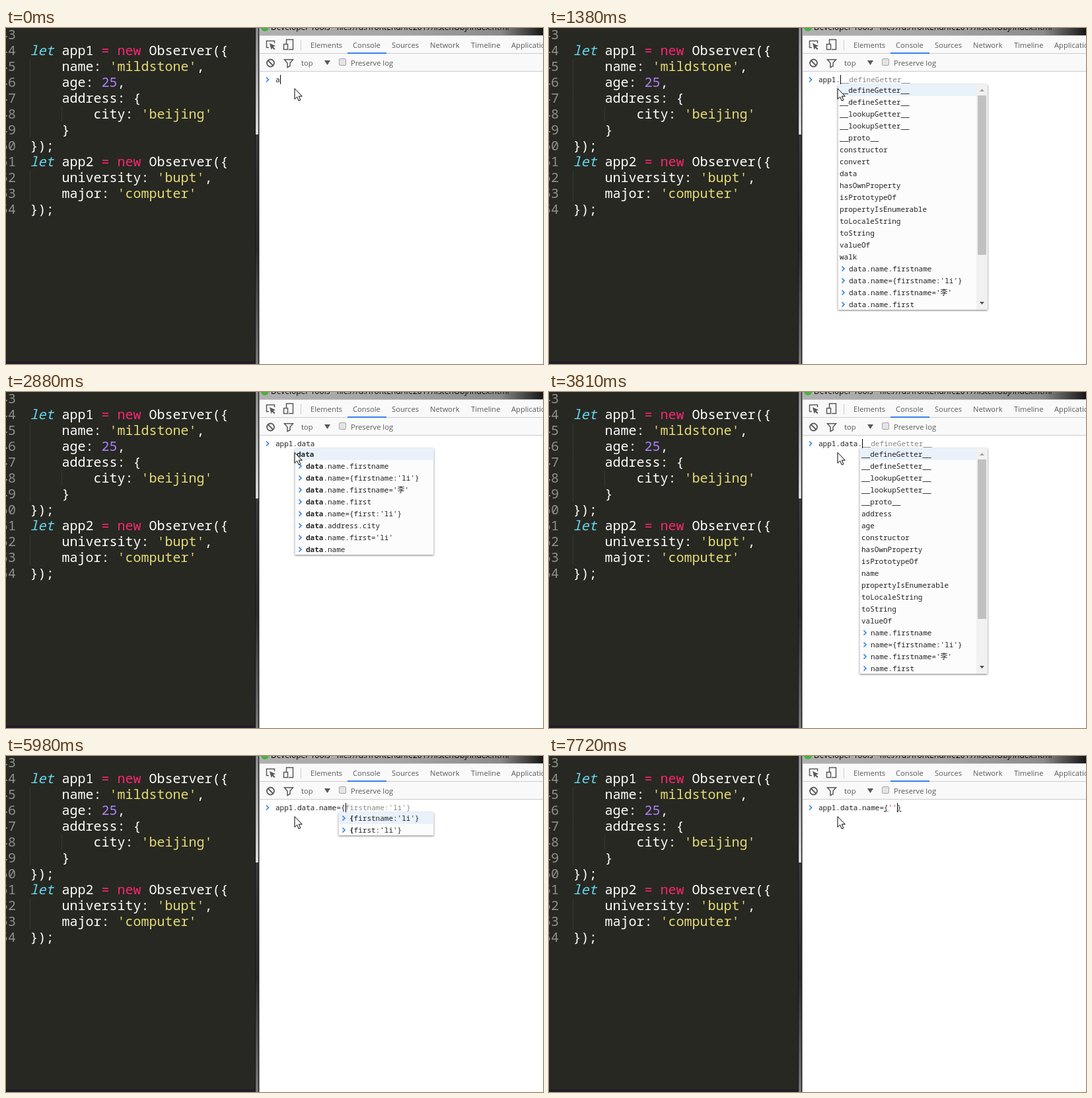
Recreate the animation shown at these times as an HTML page. Size 813x508 px, loop 8 s.

```html
<!DOCTYPE html>
<html lang="en">
<head>
<meta charset="utf-8">
<title>Observer console</title>
<style>
html, body { margin: 0; width: 100%; height: 100%; overflow: hidden; background: #fff; }
svg { display: block; width: 813px; height: 508px; }
text { white-space: pre; }
.code { font: 500 20px "Noto Sans Mono", "DejaVu Sans Mono", monospace; fill: #fff; }
.num { fill: #8f908a; text-anchor: end; }
.let { fill: #66d9ef; font-style: italic; }
.op { fill: #f92672; }
.str { fill: #e6db74; }
.val { fill: #ae81ff; }
.ui { font: 11.2px "Open Sans", "Noto Sans", sans-serif; fill: #5a5a5a; }
.mono { font: 11px "Noto Sans Mono", "Noto Sans CJK SC", "DejaVu Sans Mono", monospace; fill: #222; }
.hint { fill: #888; }
.quote { fill: #c41a16; }
.pair { text-decoration: underline; text-decoration-skip-ink: none; }
.b { font-weight: 700; }
.chevron { fill: none; stroke: #2f7de9; stroke-width: 1.6; }
.icon { fill: none; stroke: #5a5a5a; stroke-width: 1.5; }
.popup { filter: drop-shadow(0 1px 1.5px #0008); }
</style>
</head>
<body>
<svg viewBox="0 0 813 508">
  <defs>
    <linearGradient id="thumb" x2="0" y2="1">
      <stop stop-color="#8a8a8a"/><stop offset="1" stop-color="#dcdcdc"/>
    </linearGradient>
    <linearGradient id="track" x2="0" y2="1">
      <stop stop-color="#3a3a3a"/><stop offset=".5" stop-color="#2c2c2c"/><stop offset="1" stop-color="#777"/>
    </linearGradient>
    <linearGradient id="title">
      <stop stop-color="#b0b0b0"/><stop offset=".5" stop-color="#a4a4a4"/>
      <stop offset=".85" stop-color="#8a8a8a"/><stop offset="1" stop-color="#161616"/>
    </linearGradient>
  </defs>

  <rect width="377" height="508" fill="#272822"/>
  <rect y="504" width="377" height="4" fill="#221d28"/>
  <path d="M36.500 48V166M36.500 216V262M84.500 119V142" stroke="#4a4b44" stroke-dasharray="1 1"/>
  <g id="editor"></g>
  <rect x="377" width="6" height="508" fill="#17161a"/>
  <rect x="378" width="4" height="161" fill="url(#thumb)"/>
  <rect x="378" y="161" width="4" height="347" fill="url(#track)"/>

  <rect x="383" width="430" height="508" fill="#fff"/>
  <path d="M383.500 0V508" stroke="#999"/>
  <rect x="384" width="429" height="11" fill="url(#title)"/>
  <circle cx="392" cy="-1" r="6" fill="#4caf3f"/>
  <text class="ui" x="401" y="2.500" style="font-size:12px;fill:#000">Developer Tools - file:///d:/frontEnd/ife2017/listenObj/index.html</text>
  <rect x="384" y="11" width="429" height="55" fill="#f9f9f9"/>
  <path d="M384 11.500H813M384 38.500H813M384 65.500H813M446.500 18V34" stroke="#ccc"/>
  <rect x="517" y="37" width="59" height="2" fill="#3b82f0"/>
  <g id="tabs"></g>

  <g class="icon">
    <path d="M398 29.500H394.500V19.500H406.500V23"/>
    <path d="M399 23l9 4-3.500 1.500 3 3-1.500 1.500-3-3-1.500 3z" fill="#5a5a5a" stroke="none"/>
    <path d="M424.500 24V17.500H434.500V32.500H428"/>
    <rect x="420.500" y="24.500" width="6" height="8"/>
    <circle cx="400.500" cy="53" r="5.500" stroke-width="1.800"/>
    <path d="M396.500 49l8 8" stroke-width="1.800"/>
    <path d="M421.500 47.700H434.500L430 53V57.500L426 59.500V53Z"/>
  </g>
  <path d="M482 49h9l-4.500 7z" fill="#5a5a5a"/>
  <rect x="504.500" y="46.500" width="10" height="10" rx="1.500" fill="#e4e4e4" stroke="#a5a5a5"/>
  <path class="chevron" d="M394 74.500l3.500 3.500-3.500 3.500"/>

  <g id="live"></g>
  <path d="M437 91.500v16l3.700-3.400 2.600 6 2.600-1.200-2.600-5.700h5z" fill="#fff" stroke="#000"/>
</svg>

<script>
const CHAR = 6.6, INPUT_X = 408, TOP = 85, ROW = 18, MAX_ROWS = 19, LOOP = 8000;
const el = id => document.getElementById(id);
const span = (cls, s) => `<tspan class="${cls}">${s}</tspan>`;
const text = (cls, x, y, s) => `<text class="${cls}" x="${x}" y="${y}">${s}</text>`;

const source = [
  "",
  "let app1 = new Observer({",
  "    name: 'mildstone',",
  "    age: 25,",
  "    address: {",
  "        city: 'beijing'",
  "    }",
  "});",
  "let app2 = new Observer({",
  "    university: 'bupt',",
  "    major: 'computer'",
  "});"
];
const paint = line => line.replace(/('.*?')|\b(let)\b|(=|\bnew\b)|\b(\d+)\b/g,
  (s, str, word, op) => span(str ? "str" : word ? "let" : op ? "op" : "val", s));
el("editor").innerHTML = source.map((line, i) => {
  const y = 17 + 24 * i;
  return text("code num", 15, y, 43 + i) + text("code", 36.5, y, paint(line));
}).join("");

const labels = [[461, "Elements"], [525, "Console"], [584, "Sources"], [642, "Network"],
  [704, "Timeline"], [765, "Application"], [447, "top", 57], [522, "Preserve log", 57]];
el("tabs").innerHTML = labels.map(([x, s, y = 30]) => text("ui", x, y, s)).join("");

// Completions by the expression before the word being typed
const dunder = ["__defineGetter__", "__defineSetter__", "__lookupGetter__", "__lookupSetter__", "__proto__"];
const tail = ["propertyIsEnumerable", "toLocaleString", "toString", "valueOf"];
const members = {
  "": ["addEventListener", "alert", "applicationCache", "atob"],
  "app1.": [...dunder, "constructor", "convert", "data", "hasOwnProperty", "isPrototypeOf", ...tail, "walk"],
  "app1.data.": [...dunder, "address", "age", "constructor", "hasOwnProperty", "isPrototypeOf", "name", ...tail]
};
const history = [
  "app1.data.name.firstname", "app1.data.name={firstname:'li'}", "app1.data.name.firstname='李'",
  "app1", "app1.data.name.first", "app1.data.name={first:'li'}", "app1.data.address.city",
  "app.data.name={first:'li'}", "app1.data.name.first='li'", "app1.data.name",
  "app.user.name", "app1.name", "app.user"
];

// [time, input with "|" as a visible caret, popup query if it differs from the input]
const steps = [
  [0, "a|", ""], [270, "a|"], [550, "ap|"], [700, "app|"], [950, "app1|"], [1380, "app1.|"],
  [1940, "app1.d|", "app1."], [2090, "app1.d|"], [2210, "app1.da|"], [2330, "app1.dat|"],
  [2480, "app1.data|"], [2880, "app1.data"], [3410, "app1.data|"],
  [3690, "app1.data.|", ""], [3810, "app1.data.|"], [4080, "app1.data.n|"],
  [4200, "app1.data.na|"], [4350, "app1.data.nam|"], [4500, "app1.data.name|"],
  [4970, "app1.data.name"], [5550, "app1.data.name=|"], [5980, "app1.data.name={|"],
  [6410, "app1.data.name={"], [6560, "app1.data.name={}|", ""], [6860, "app1.data.name={|}", ""],
  [7450, "app1.data.name={}", ""], [7600, "app1.data.name={'|}", ""], [7720, "app1.data.name={''|}", ""]
];

function suggest(query) {
  const start = query.search(/[^.=]*$/), word = query.slice(start);
  const found = (members[query.slice(0, start)] || []).filter(s => s.startsWith(word));
  const past = history.filter(s => s.startsWith(query)).map(s => s.slice(start));
  return { start, word, fresh: found.length, rows: [...found, ...past] };
}

function drawPopup({ start, word, fresh, rows }) {
  const left = INPUT_X + start * CHAR - 3.5, scrolls = rows.length > MAX_ROWS;
  const shown = rows.slice(0, MAX_ROWS), height = shown.length * ROW;
  const width = (scrolls ? 664 : 647.5) - left;
  let out = `<rect class="popup" x="${left}" y="${TOP}" width="${width}" height="${height - 1}" fill="#fcfcfc"/>
    <rect x="${left}" y="${TOP}" width="${647.5 - left}" height="${ROW}" fill="#e9f1fb"/>`;
  shown.forEach((s, i) => {
    const y = TOP + ROW * i + 9, past = i >= fresh;
    if (past) out += `<path class="chevron" d="M${left + 6} ${y - 3.5}l3.500 3.500-3.500 3.500"/>`;
    out += text("mono", left + (past ? 16.5 : 2.5), y + 4, span("b", word) + s.slice(word.length));
  });
  if (scrolls) out += `<rect x="647" y="${TOP}" width="17" height="${height - 1}" fill="#f1f1f1"/>
    <rect x="649" y="102" width="13" height="241" fill="#c1c1c1"/>
    <path d="M652 96h7l-3.500-4z" fill="#a3a3a3"/><path d="M652 414h7l-3.500 4z" fill="#505050"/>`;
  return out;
}

function draw([, input, query]) {
  const typed = input.replace("|", ""), caret = input.indexOf("|");
  const key = query ?? typed;
  const list = key && suggest(key);
  let line = typed.replace(/'/g, s => span("quote", s));
  if (typed.endsWith("}")) line = line.replace(/[{}]/g, s => span("pair", s));
  if (list) line += span("hint", list.rows[0].slice(typed.length - list.start));
  let out = text("mono", INPUT_X, 82, line);
  if (list) out += drawPopup(list);
  if (caret >= 0) out += `<rect x="${Math.round(INPUT_X + caret * CHAR)}" y="71" width="1" height="14"/>`;
  el("live").innerHTML = out;
}

let current;
function frame() {
  const t = performance.now() % LOOP;
  const step = steps.findLast(s => s[0] <= t);
  if (step !== current) draw(current = step);
  requestAnimationFrame(frame);
}
frame();
</script>
</body>
</html>
```
